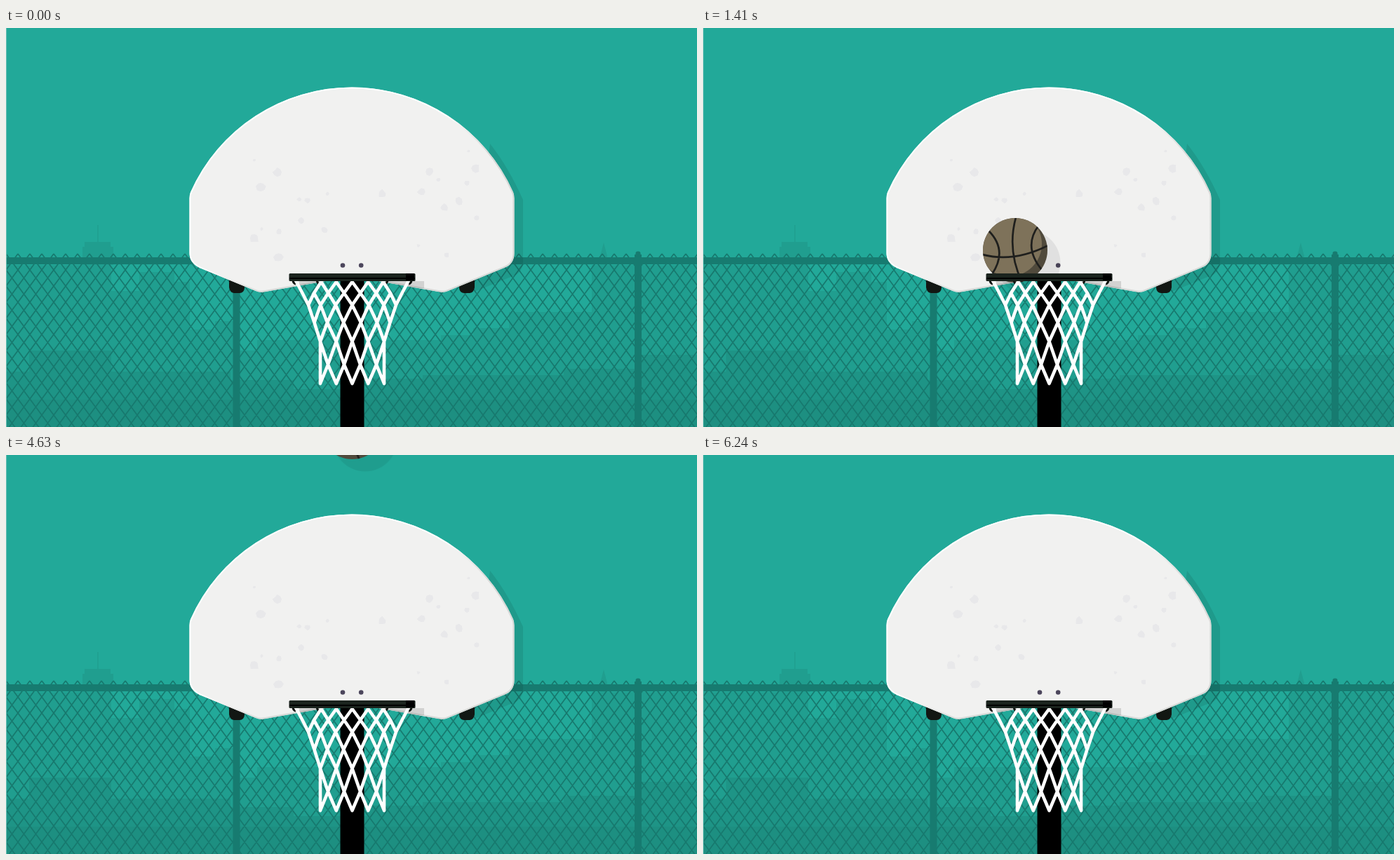
Animation, 985 px wide and 569 px high, one loop 8000 ms. Source, as an HTML page:

```html
<!DOCTYPE html>
<html lang="en">
<head>
<meta charset="utf-8">
<title>Basketball hoop</title>
<style>
  html, body { margin: 0; width: 100%; height: 100%; overflow: hidden; background: #22a999; }
  svg { display: block; width: 100vw; height: 100vh; }
  /* Two shots: one off the rim, one straight through; the ball advances every 70 ms */
  #ball { animation: shots 8s -6ms infinite; }
  @keyframes shots {
    0%      { transform: translate(-200px, -200px); animation-timing-function: step-end; }
    6.25%   { transform: translate(-12px, -33px); animation-timing-function: steps(12); }
    16.75%  { transform: translate(410px, 303px); animation-timing-function: step-end; }
    17.625% { transform: translate(445px, 317px); animation-timing-function: steps(5); }
    22%     { transform: translate(670px, 164px); animation-timing-function: steps(8); }
    29%     { transform: translate(1004px, -55px); animation-timing-function: step-end; }
    29.01%  { transform: translate(-200px, -200px); animation-timing-function: step-end; }
    57.875% { transform: translate(493.5px, -40px); animation-timing-function: steps(23); }
    78%     { transform: translate(493.5px, 638px); animation-timing-function: step-end; }
    78.01%, 100% { transform: translate(-200px, -200px); }
  }
</style>
</head>
<body>
<svg viewBox="0 0 985 569" preserveAspectRatio="none">
  <defs>
    <linearGradient id="edge" x1="0" y1="0" x2="1" y2="1">
      <stop offset=".45" stop-color="#fff"/>
      <stop offset=".62" stop-color="#d6d8d6"/>
    </linearGradient>
    <path id="board" d="M261.5 243Q261.5 238 263 234.3A251.5 251.5 0 0 1 723 234.3Q724.5 238 724.5 243V321Q724.5 337 710 342L630 375Q624 378 616 376L531 361H455L370 376Q362 378 356 375L276 342Q261.5 335 261.5 321Z"/>
    <clipPath id="boardClip"><use href="#board"/></clipPath>
    <clipPath id="ballClip"><circle r="46"/></clipPath>
  </defs>

  <rect width="985" height="569" fill="#22a999"/>

  <g fill="#000" fill-opacity=".065">
    <path d="M109 338V312H112V305H130.3V281H131.7V305H149V312H153V338ZM847 338V325L852 306L857 325V338Z"/>
    <path d="M0 338H150V375H190V348H240V362H262V430H298V418H326V460H358V445H620V438H666V428H717V405H835V338H985V569H0Z"/>
    <path d="M0 490H33V460H150V490H320V502H410V515H515V500H594V495H795V486H905V466H985V569H0Z"/>
    <rect y="530" width="985" height="39" fill-opacity=".035"/>
  </g>

  <path id="mesh" fill="none" stroke="#17796e" stroke-width="1.7"/>
  <g fill="#177b70">
    <rect y="327" width="985" height="10"/>
    <rect x="323.5" y="337" width="10" height="232"/>
    <rect x="896" y="323" width="10" height="246"/>
    <rect x="897.5" y="318.5" width="7" height="8" rx="3"/>
  </g>
  <rect width="1" height="569" fill="#6dbfb5"/>

  <path d="M690 165Q716 198 737 245V333Q737 349 722 354L668 376V340Z" fill-opacity=".09"/>
  <path id="bracket" d="M318 358H340V371Q339 378 333 378H325Q319 377 318 370Z" fill="#121713"/>
  <use href="#bracket" transform="translate(986) scale(-1 1)"/>
  <rect x="476.5" y="355" width="34" height="214"/>

  <use href="#board" fill="#f1f1f0"/>
  <g clip-path="url(#boardClip)">
    <path id="spots" fill="#e8e8ea"/>
    <use href="#board" fill="none" stroke="url(#edge)" stroke-width="4"/>
    <rect x="418" y="361" width="178" height="10" fill-opacity=".13"/>
  </g>
  <g fill="#4c465c"><circle cx="480" cy="338.5" r="3.3"/><circle cx="506.2" cy="338.5" r="3.3"/></g>

  <g id="ball">
    <circle cx="18.5" cy="17.5" r="46" fill-opacity=".065"/>
    <circle r="46" fill="#504a3c"/>
    <g clip-path="url(#ballClip)">
      <circle cx="-8" cy="-9" r="46" fill="#7e725a"/>
      <path d="M1 -47Q-12 0 10 46M-47 6Q-2 18 47 -7M-38 -28Q-10 0 -33 34M34 -36Q10 -5 39 29" fill="none" stroke="#1f1f1d" stroke-width="2.7"/>
    </g>
  </g>

  <path id="hooks" d="M409 359Q409 364 413 365M443 359Q444 366 449 366" fill="none" stroke="#101410" stroke-width="3"/>
  <use href="#hooks" transform="translate(987) scale(-1 1)"/>
  <path id="net" fill="none" stroke="#fff" stroke-width="4.6" stroke-linecap="round" stroke-linejoin="round"/>
  <rect x="403.5" y="350" width="180" height="11" rx="1.5" fill="#1b241e"/>
  <path d="M404 356H583V358H404ZM570 350H582V360H570Z"/>
</svg>
<script>
(() => {
  const setPath = (id, d) => document.getElementById(id).setAttribute('d', d);

  // Chain link: both diagonals from every knuckle along the top
  const pitch = 17, rise = 23, meshTop = 322, drop = 253;
  const run = drop * pitch / rise;
  let mesh = '';
  for (let x = -204; x < 1190; x += pitch)
    for (const side of [-1, 1]) mesh += `M${x} ${meshTop}l${side * run} ${drop}`;
  setPath('mesh', mesh);

  // Net: rows of knots spread over a half width, crowding toward the sides of the round part
  const mid = 493.5;
  const row = (y, count, half) => Array.from({ length: count }, (_, i) => {
    const u = 2 * i / (count - 1) - 1;
    const bow = count > 5 ? 0.15 * (u - u ** 3) : 0;
    return [mid + half * (u + bow), y];
  });
  const rows = [362, 378, 395, 420, 447].map((y, k) => row(y, 9 - k, 79.5 - 8.5 * k));
  rows.push(row(480, 4, 34.5), row(507, 5, 45.5));

  let net = '';
  const tie = (a, b) => { net += `M${a}L${b}`; };
  for (let k = 1; k < rows.length; k++) {
    const [few, many] = [rows[k - 1], rows[k]].sort((a, b) => a.length - b.length);
    few.forEach((knot, i) => {
      for (const j of [i, i + 1]) {
        const noHook = k === 1 && (j === 1 || j === 7);
        if (!noHook) tie(knot, many[j]);
      }
    });
  }
  for (const i of [0, 4]) tie(rows[4][i], rows[6][i]);
  setPath('net', net);

  // Worn patches scattered around two areas of the board
  let seed = 7;
  const rand = () => (seed = seed * 16807 % 2147483647) / 2147483647;
  const spread = size => (rand() + rand() - 1) * size;
  const patch = (x, y, r) => 'M' + Array.from({ length: 8 }, (_, i) => {
    const a = i * Math.PI / 4, d = r * (0.7 + 0.5 * rand());
    return [x + d * Math.cos(a), y + d * Math.sin(a)];
  }).join('L') + 'Z';
  let spots = '';
  for (let i = 0; i < 24; i++)
    spots += patch((i % 2 ? 395 : 610) + spread(80), 250 + spread(90), 2 + 5 * rand());
  setPath('spots', spots);
})();
</script>
</body>
</html>
```
